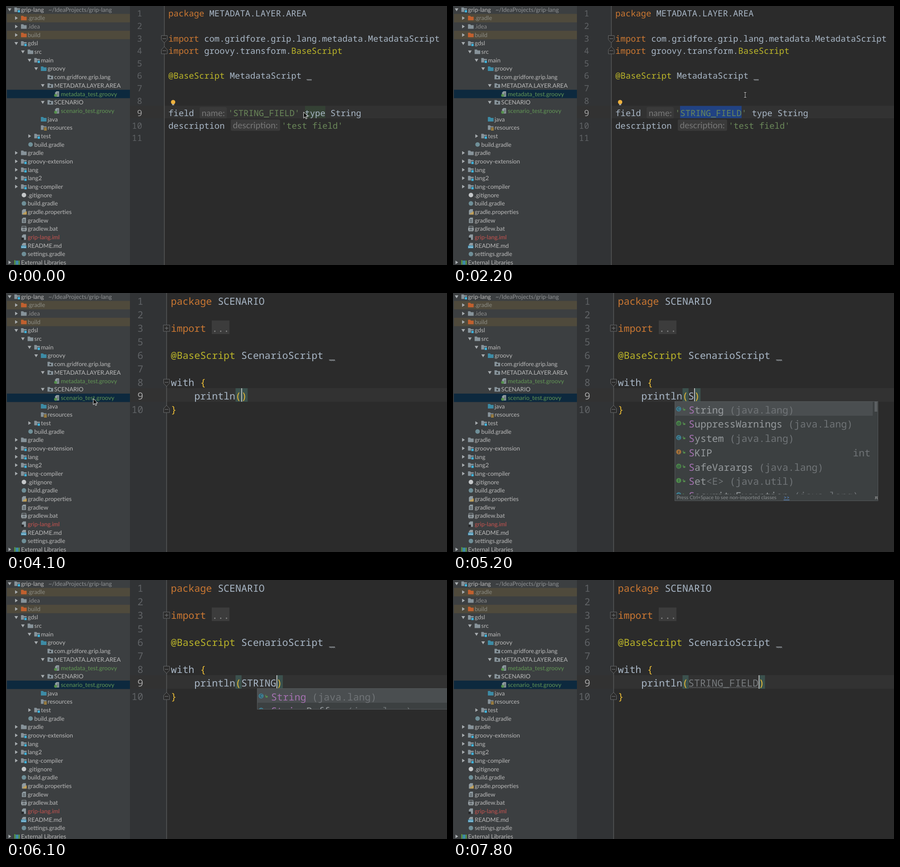
Animation, 975 px wide and 574 px high, one loop 8 s. Source, as an HTML page:

```html
<!DOCTYPE html>
<html lang="en">
<head>
<meta charset="utf-8">
<title>Script editor completion</title>
<style>
html, body { margin: 0; width: 100%; height: 100%; overflow: hidden; background: #2b2b2b; }
svg { display: block; }
text { white-space: pre; text-rendering: geometricPrecision; }
.mono { font-family: "Noto Sans Mono", "DejaVu Sans Mono", monospace; }
.ui { font-family: Lato, "Open Sans", sans-serif; }
</style>
</head>
<body>
<svg id="stage" width="975" height="574" viewBox="0 0 975 574"></svg>
<script>
const LOOP = 8000, STEP = 100;
const C = {
  plain: '#a9b7c6', key: '#cc7832', note: '#bbb529', str: '#6a8759', gold: '#e8ba36',
  num: '#606366', dim: '#787878', side: '#bbbbbb', folder: '#87939a', src: '#3d8ba5',
  out: '#c0602f', tag: '#40b6e0', vcs: '#629755', hit: '#a571b1', match: '#3b514d'
};

const rect = (x, y, w, h, fill, more = '') =>
  `<rect x="${x}" y="${y}" width="${w}" height="${h}" fill="${fill}" ${more}/>`;
const dot = (x, y, r, fill) => `<circle cx="${x}" cy="${y}" r="${r}" fill="${fill}"/>`;
const path = (d, stroke, fill = 'none', w = 1) =>
  `<path d="${d}" stroke="${stroke}" fill="${fill}" stroke-width="${w}"/>`;
const label = (x, y, size, fill, s, more = '') =>
  `<text class="ui" x="${x}" y="${y}" font-size="${size}" fill="${fill}" ${more}>${s}</text>`;
// parts alternate: text, colour, text, colour
function code(x, y, size, ...parts) {
  let spans = '';
  for (let i = 0; i < parts.length; i += 2) spans += `<tspan fill="${parts[i + 1]}">${parts[i]}</tspan>`;
  return `<text class="mono" x="${x}" y="${y}" font-size="${size}">${spans}</text>`;
}
function wave(x, y, w, color) {
  let d = `M${x} ${y}`;
  for (let i = 2; i <= w; i += 2) d += `L${x + i} ${y + (i % 4 ? -1.5 : 0)}`;
  return path(d, color, 'none', 0.9);
}

// ---------- project tree ----------
const folder = fill => path('M0 -5H5L6.5 -3H12.5V5H0Z', 'none', fill);
const page = fill => path('M5 -6H11V6H2V-3Z', 'none', fill);
const icons = {
  dir: folder(C.folder),
  out: folder(C.out),
  src: folder(C.src),
  mod: folder(C.folder) + rect(6.5, 0, 7, 6.5, '#3c3f41') + rect(7.5, 1, 5, 5, C.tag),
  pkg: folder(C.folder) + dot(6.2, 1, 2, '#33383b'),
  res: folder(C.folder) + rect(6, -1, 7, 7.5, '#3c3f41') + [0, 2.4, 4.8].map(y => rect(7, y, 6, 1.4, '#d6a33c')).join(''),
  script: page('#8f9ba1') + dot(3.2, 3.2, 3.2, '#56924c') + rect(7, -3, 2, 7, '#64716f'),
  build: dot(6.5, 0, 5, '#6f8f98'),
  ignore: dot(6.5, 0, 5, '#c4c7c9'),
  props: page('#8f9ba1') + [3, 5, 7].map((h, i) => rect(4.5 + i * 3, 6 - h, 2, h, '#d6a33c')).join(''),
  file: page('#8f9ba1') + [-2, 0.5, 3].map(y => rect(4, y, 5, 1.2, '#454b4e')).join(''),
  bat: path('M2 -5.5H11V5.5H2Z', '#a3adb2') + rect(0.5, -2, 12, 6, '#a3adb2') + rect(3, 0, 7, 2, '#454b4e'),
  iml: page('#8f9ba1') + rect(1, 1, 5.5, 5.5, '#26282a'),
  doc: page('#8f9ba1') + rect(0, 0, 12, 6, '#3f91b5') + path('M2 5V2L4 4L6 2V5M9 1.5V5M7.5 3.5L9 5L10.5 3.5', '#d8e4ea'),
  libs: ['#62b543', C.tag, C.tag, '#62b543'].map((c, i) => rect(i * 3.2, i ? -4 : -5, 2, i ? 9 : 10, c)).join('')
};
// depth, arrow (v open, > closed, - none), icon, name, colour
const tree = [
  [0, 'v', 'mod', 'grip-lang'], [1, '>', 'out', '.gradle', '#8c8c84'], [1, '>', 'dir', '.idea', '#8c8c8c'],
  [1, '>', 'out', 'build', '#8c8c84'], [1, 'v', 'mod', 'gdsl'], [2, 'v', 'dir', 'src'],
  [3, 'v', 'mod', 'main'], [4, 'v', 'src', 'groovy'], [5, '-', 'pkg', 'com.gridfore.grip.lang'],
  [5, 'v', 'pkg', 'METADATA.LAYER.AREA'], [6, '-', 'script', 'metadata_test.groovy', C.vcs],
  [5, 'v', 'pkg', 'SCENARIO'], [6, '-', 'script', 'scenario_test.groovy', C.vcs],
  [4, '-', 'src', 'java'], [4, '-', 'res', 'resources'], [3, '>', 'mod', 'test'],
  [2, '-', 'build', 'build.gradle'], [1, '>', 'dir', 'gradle'], [1, '>', 'mod', 'groovy-extension'],
  [1, '>', 'mod', 'lang'], [1, '>', 'mod', 'lang2'], [1, '>', 'mod', 'lang-compiler'],
  [1, '-', 'ignore', '.gitignore'], [1, '-', 'build', 'build.gradle'], [1, '-', 'props', 'gradle.properties'],
  [1, '-', 'file', 'gradlew'], [1, '-', 'bat', 'gradlew.bat'], [1, '-', 'iml', 'grip-lang.iml', '#c75450'],
  [1, '-', 'doc', 'README.md'], [1, '-', 'build', 'settings.gradle'], [0, '>', 'libs', 'External Libraries']
];
const rowY = i => 8.2 + i * 18.67;

function sidebar() {
  let s = rect(0, 0, 274, 574, '#3c3f41') + rect(0, 0, 1, 574, '#323537');
  for (const i of [1, 3]) s += rect(2, rowY(i) - 9.3, 272, 18.7, '#4f4a3c');
  s += rect(2, 0, 272, 18.7, '#0d293e', 'id="pick"');
  tree.forEach(([depth, arrow, icon, name, color = C.side], i) => {
    const x = depth * 14.65, y = rowY(i);
    if (arrow === 'v') s += path(`M${x + 4} ${y - 3}h8l-4 6.5z`, 'none', '#a8adb0');
    if (arrow === '>') s += path(`M${x + 5.5} ${y - 4}v8l6 -4z`, 'none', '#a8adb0');
    s += `<g transform="translate(${x + 18.5} ${y})">${icons[icon]}</g>`;
    s += label(x + 33.3, y + 4.6, 13.1, color, name);
  });
  return s + label(94, rowY(0) + 4.6, 13.1, '#8f9294', '~/IdeaProjects/grip-lang');
}

// ---------- editors ----------
function fold(x, y, kind) {
  const d = {
    down: `M${x - 6.5} ${y - 7}h13v9l-6.5 7l-6.5 -7z`,
    up: `M${x - 6.5} ${y + 7}h13v-9l-6.5 -7l-6.5 7z`,
    plus: `M${x - 7} ${y - 7}h14v14h-14z`
  }[kind];
  return path(d, '#6b6d6e', '#2b2b2b') +
    path(`M${x - 4} ${y}h8` + (kind === 'plus' ? `M${x} ${y - 4}v8` : ''), '#808283');
}
function frame(lineX, rowTop, rowH) {
  return rect(274, 0, 701, 574, '#2b2b2b') + rect(274, 0, lineX - 274, 574, '#313335') +
    rect(274, rowTop, 701, rowH, '#323232') + rect(lineX - 0.5, 0, 1.2, 574, '#606263');
}
const numbers = (list, right, size, base, pitch) => list.map((n, i) =>
  `<text class="mono" x="${right}" y="${base + i * pitch}" font-size="${size}" text-anchor="end" ` +
  `fill="${n === 9 ? '#a4a3a3' : C.num}">${n}</text>`).join('');
const hint = (x, y, w, s) => rect(x, y, w, 25, '#3a3a3a', 'rx="3"') + label(x + 4.5, y + 19.5, 19.3, C.dim, s);

function metadataEditor() {
  const size = 18.88, x = 359, at = n => 23.3 + 27.6 * (n - 1);
  return frame(350, 221, 28) +
    numbers([1, 2, 3, 4, 5, 6, 7, 8, 9, 10, 11], 301, size, 23.3, 27.6) +
    fold(350, 72.5, 'down') + fold(350, 99, 'up') +
    rect(661, 221.5, 45, 27, '#344134', 'id="usage"') +
    rect(502, 221.5, 136, 27, '#214283', 'id="selection"') +
    code(x, at(1), size, 'package ', C.key, 'METADATA.LAYER.AREA', C.plain) +
    code(x, at(3), size, 'import ', C.key, 'com.gridfore.grip.lang.metadata.MetadataScript', C.plain) +
    code(x, at(4), size, 'import ', C.key, 'groovy.transform.', C.plain, 'BaseScript', C.note) +
    code(x, at(6), size, '@BaseScript', C.note, ' MetadataScript ', C.plain, '_', '#8a8f94') +
    wave(666, at(6) + 4, 11, '#8a8f94') +
    code(x, at(9), size, 'field', C.plain) + hint(428, 224, 60, 'name:') +
    code(491, at(9), size, "'STRING_FIELD'", C.str, ' type String', C.plain) +
    code(x, at(10), size, 'description', C.plain) + hint(497, 251.5, 109, 'description:') +
    code(609, at(10), size, "'test field'", C.str) +
    `<g id="bulb">${dot(369.5, 213, 4.8, '#eeb13c')}${rect(367.3, 217, 4.4, 3, '#a3a3a3')}</g>`;
}

const SIZE = 21.6, ADV = SIZE * 0.6, ARG_X = 521;
const lineB = i => 25.5 + 30.05 * i;
function scenarioEditor() {
  const x = 364.5;
  return frame(355, 211, 30) + numbers([1, 2, 3, 5, 6, 7, 8, 9, 10], 303.5, SIZE, 25.5, 30.05) +
    fold(355, 78, 'plus') + fold(355, 198, 'down') + fold(355, 258, 'up') +
    rect(455, 61, 39, 30, '#3c3c3c') +
    code(x, lineB(0), SIZE, 'package ', C.key, 'SCENARIO', C.plain) +
    code(x, lineB(2), SIZE, 'import ', C.key, '...', '#8c8c8c') +
    code(x, lineB(4), SIZE, '@BaseScript', C.note, ' ScenarioScript ', C.plain, '_', '#8a8f94') +
    wave(716, lineB(4) + 5, 12, '#8a8f94') +
    code(x, lineB(6), SIZE, 'with ', C.plain, '{', C.gold) +
    code(x, lineB(8), SIZE, '}', C.gold) + '<g id="call"></g>';
}
function callLine(typed, unresolved) {
  const end = ARG_X + typed.length * ADV, y = lineB(7);
  return rect(507.5, 211, 13.3, 30, C.match) + rect(end, 211, 13.3, 30, C.match) +
    code(364.5 + 4 * ADV, y, SIZE, 'println', C.plain, '(', C.gold, typed, unresolved ? '#787b7e' : C.plain, ')', C.gold) +
    (unresolved ? wave(ARG_X, 239, end - ARG_X - 1, '#74787a') : '') +
    rect(end - 0.8, 211, 1.7, 30, '#d0d0d0');
}

// ---------- completion popup ----------
const marks = { C: '#3f7f93', E: '#3f7f93', '@': '#4f8a4b', I: '#4f8a4b', f: '#a5713a' };
const LANG = '(java.lang)', UTIL = '(java.util)';
// names alternate matched and unmatched pieces
const lists = {
  S: [['C', 'S|tring', LANG], ['@', 'S|uppressWarnings', LANG], ['C', 'S|ystem', LANG], ['f', 'S|KIP', 'int'],
    ['@', 'S|afeVarargs', LANG], ['I', 'S|et', '&lt;E> ' + UTIL], ['C', 'S|ecurityException', LANG]],
  ST: [['C', 'St|ring', LANG], ['C', 'St|rictMath', LANG], ['C', 'St|ringBuffer', LANG], ['C', 'St|ringBuilder', LANG],
    ['C', 'St|ringJoiner', UTIL], ['C', 'St|ack', UTIL], ['C', 'St|ringTokenizer', UTIL]],
  STRI: [['E', 'Str|ing|I|ndexOutOfBoundsException', ''], ['C', 'Stri|ng', LANG], ['C', 'Stri|ctMath', LANG],
    ['C', 'Stri|ngBuffer', LANG], ['C', 'Stri|ngBuilder', LANG], ['C', 'Stri|ngJoiner', UTIL], ['C', 'Stri|ngTokenizer', UTIL]],
  STRING: [['C', 'String', LANG], ['C', 'String|Buffer', LANG]]
};
// start, end, list, x, list height, footer, scroll thumb, busy
const popups = [
  [5200, 5300, 'S', 490, 206, true, 22], [5300, 5500, 'ST', 490, 206, true, 60],
  [5500, 5700, 'STRI', 490, 206, false, 190], [5700, 5900, 'STRI', 490, 206, false, 190, true],
  [5900, 6100, 'STRI', 490, 206, true, 190], [6100, 6400, 'STRING', 555, 47, false, 0]
];

function popupRow([mark, name, tail], i) {
  const y = 18 + i * 31.7, base = y + 8.7, parts = [];
  name.split('|').forEach((s, k) => parts.push(s, k % 2 ? '#979b9e' : C.hit));
  const right = tail === 'int';
  if (tail && !right) parts.push((tail[0] === '(' ? ' ' : '') + tail, '#707477');
  return dot(9, y - 1, 5.6, marks[mark]) +
    (mark === 'E' ? path(`M10 ${y - 4.5}l-3 4h4l-3 4`, '#23323a', 'none', 1.2)
      : label(9, y + 2.4, 9, '#23323a', mark, 'text-anchor="middle"')) +
    rect(19, y - 1, 4.5, 3.5, '#568f4e') + path(`M18.5 ${y}v-3h2`, '#568f4e') +
    code(31, base, SIZE, ...parts) +
    (right ? code(394, base, SIZE, tail, '#707477') : '');
}
function popup([, , key, x, h, footer, thumb, busy]) {
  const full = h + (footer ? 15 : 0);
  let s = rect(0, 0, 450, full, '#3c4041') + rect(0, 1, x > 500 ? 450 : 438, 31, '#4a4e50') + lists[key].map(popupRow).join('');
  if (thumb) s += rect(442, 1, 6, thumb, '#5c6062');
  if (busy) {
    for (let a = 0; a < 8; a++)
      s += `<path d="M431 4.5v-2.5" stroke="#a0a3a5" transform="rotate(${a * 45} 431 7)"/>`;
  }
  if (footer) {
    s += rect(0, h, 450, 15, '#3c4041') +
      label(4.5, h + 11, 11.1, '#8b8e90', 'Press Ctrl+Space to see non-imported classes') +
      label(241, h + 11, 11.1, '#5a90d6', '&gt;&gt;', 'text-decoration="underline"') +
      label(442.5, h + 11, 11, '#bbbbbb', 'π');
  }
  s += rect(0.5, 0.5, 449, full - 1, 'none', 'stroke="#55595b"');
  return `<svg x="${x}" y="240" width="450" height="${full}" overflow="hidden">${s}</svg>`;
}

// ---------- pointer and timing ----------
const pointers = {
  arrow: path('M0 0V13.5L3.2 10.6L5.2 15.2L7.4 14.2L5.4 9.8H9.6Z', '#ffffff', '#000000'),
  beam: path('M-2.5 -5.5h5M0 -5.5v11M-2.5 5.5h5', '#1a1a1a', 'none', 2.6) +
    path('M-2.5 -5.5h5M0 -5.5v11M-2.5 5.5h5', '#d4d4d4', 'none', 1)
};
// first step, last step, end point
const moves = [
  [400, 400, 697, 240], [600, 1000, 600, 239], [1800, 2200, 646, 197], [2600, 2700, 616, 240],
  [3100, 3800, 193, 234], [4400, 4500, 390, 218], [4700, 4700, 508, 225]
];
function pointerAt(t) {
  let x = 658, y = 235;
  for (const [from, to, ex, ey] of moves) {
    if (t < from) break;
    const k = Math.min(1, (t - from + STEP) / (to - from + STEP));
    x += (ex - x) * k;
    y += (ey - y) * k;
  }
  return { x, y, kind: t < 400 || x < 274 ? 'arrow' : 'beam' };
}
const WORD = 'STRING_FIELD';
const keyTimes = [5000, 5300, 5500, 5700, 5900, 6100, 6400, 6500, 6700, 7100, 7300, 7500];

document.getElementById('stage').innerHTML = sidebar() +
  `<g id="metadata">${metadataEditor()}</g><g id="scenario">${scenarioEditor()}</g>` +
  '<g id="popup"></g><g id="pointer"></g>';
const $ = id => document.getElementById(id);
const show = (id, on) => { $(id).style.display = on ? '' : 'none'; };

function draw(t) {
  const inScenario = t >= 4000;
  show('metadata', !inScenario);
  show('scenario', inScenario);
  show('usage', t < 1500);
  show('selection', t >= 1200);
  show('bulb', t < 1100 || (t >= 1900 && t < 3900));
  $('pick').setAttribute('y', rowY(t < 3900 ? 10 : 12) - 9.3);

  const typed = WORD.slice(0, keyTimes.filter(k => k <= t).length);
  $('call').innerHTML = callLine(typed, t >= 7800);
  const open = popups.find(p => t >= p[0] && t < p[1]);
  $('popup').innerHTML = open ? popup(open) : '';

  const p = pointerAt(t);
  show('pointer', t < 4900);
  $('pointer').innerHTML = pointers[p.kind];
  $('pointer').setAttribute('transform', `translate(${p.x} ${p.y})`);
}

const start = performance.now();
let last = -1;
function tick() {
  const t = Math.floor((performance.now() - start) % LOOP / STEP) * STEP;
  if (t !== last) draw(last = t);
  requestAnimationFrame(tick);
}
tick();
</script>
</body>
</html>
```
